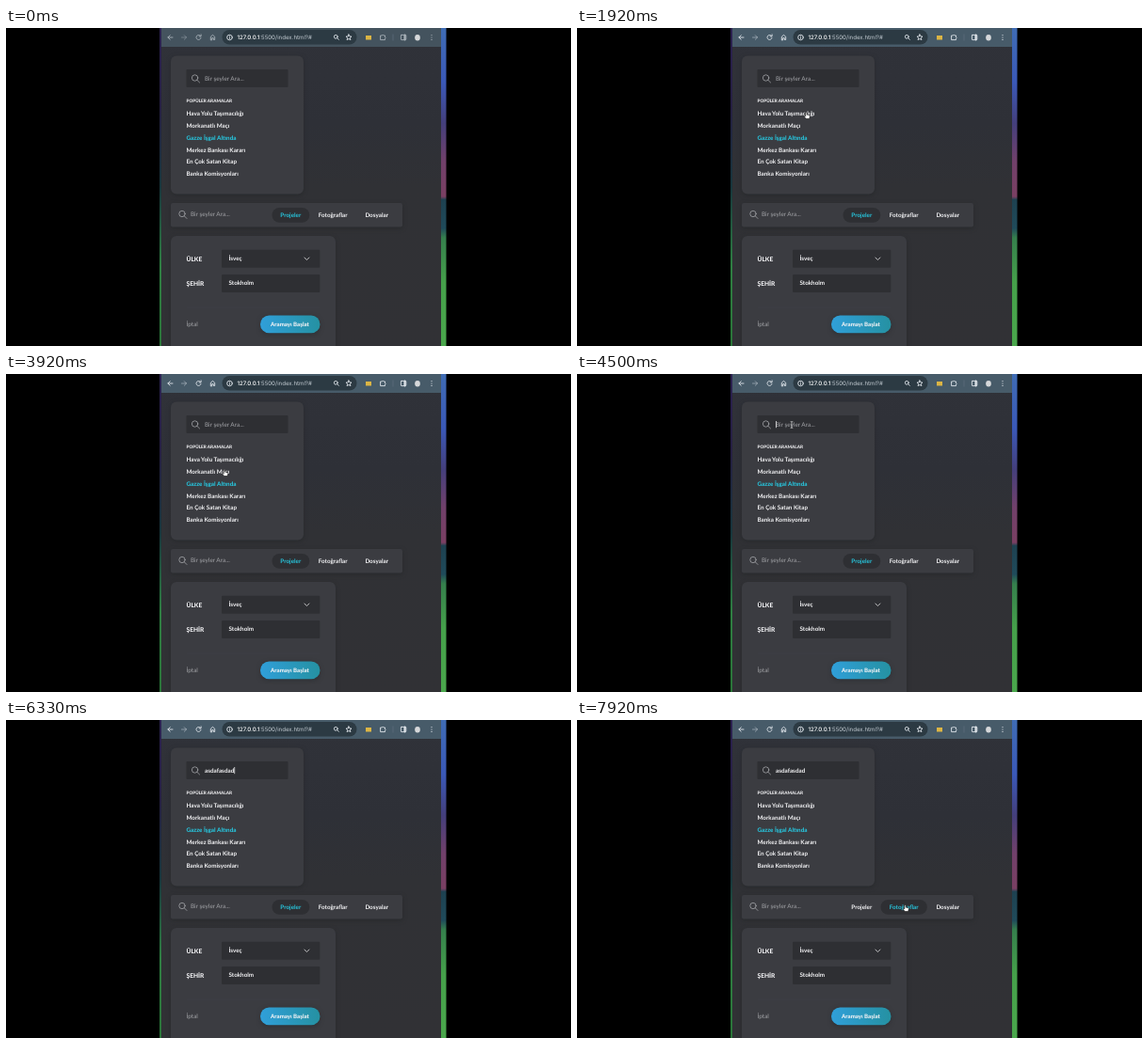
These frames come from a looping animation (600x338 px, 8000 ms). An HTML page:

```html
<!DOCTYPE html>
<html lang="tr">
<head>
<meta charset="utf-8">
<title>Arama</title>
<style>
  html, body { margin: 0; height: 100%; overflow: hidden; background: #000; }
  svg { display: block; }
  #stage { width: 100vw; height: 100vh; }
  text { font: 700 6.3px Lato, sans-serif; fill: #f3f3f5; text-rendering: geometricPrecision; }
  .bold { font-weight: 800; }
  .hint { font-weight: 500; font-size: 6.4px; fill: #9a9b9f; }
  .cyan, .tab.on { fill: #27c4dc; }
  .tab { text-anchor: middle; }
  .panel { fill: #3b3c41; filter: url(#shadow); }
  .field { fill: #2e2f33; }
  .line { fill: none; stroke: #a9aaae; stroke-width: .75; stroke-linecap: round; stroke-linejoin: round; }
  #bar { fill: #44535e; }
  #bar.active { fill: #475b69; }
  #nav { opacity: .65; }
  #nav.active { opacity: 1; }
  .icon { fill: none; stroke: #dfe5ea; stroke-width: .9; stroke-linecap: round; stroke-linejoin: round; }
  .url { font: 400 6.1px Inter, Roboto, sans-serif; fill: #c3cbd2; }
  .url tspan { fill: #fff; font-weight: 500; }
</style>
</head>
<body>
<svg id="stage" viewBox="0 0 600 338">
  <defs>
    <linearGradient id="page" x2="0" y2="1">
      <stop stop-color="#303239"/><stop offset=".3" stop-color="#2e3037"/>
      <stop offset=".5" stop-color="#303135"/><stop offset="1" stop-color="#313135"/>
    </linearGradient>
    <linearGradient id="right" x2="0" y2="1">
      <stop stop-color="#3f6cb4"/><stop offset=".17" stop-color="#3a58b8"/>
      <stop offset=".3" stop-color="#443f7c"/><stop offset=".42" stop-color="#71406a"/>
      <stop offset=".53" stop-color="#7a3f62"/><stop offset=".54" stop-color="#1d4150"/>
      <stop offset=".63" stop-color="#1f4a5a"/><stop offset=".66" stop-color="#357f4c"/>
      <stop offset=".8" stop-color="#45a04a"/><stop offset="1" stop-color="#4aa74c"/>
    </linearGradient>
    <linearGradient id="left" x2="0" y2="1">
      <stop stop-color="#2b2150"/><stop offset=".25" stop-color="#251f42"/>
      <stop offset=".5" stop-color="#17363c"/>
      <stop offset=".75" stop-color="#2f7f42"/><stop offset="1" stop-color="#2a7438"/>
    </linearGradient>
    <linearGradient id="button">
      <stop stop-color="#309fd9"/><stop offset="1" stop-color="#2591a2"/>
    </linearGradient>
    <filter id="shadow" x="-10%" y="-20%" width="120%" height="150%" color-interpolation-filters="sRGB">
      <feDropShadow dx="0" dy="1.500" stdDeviation="2.500" flood-color="#1d1e22" flood-opacity=".45"/>
    </filter>
    <g id="lens" class="line"><circle r="3.2"/><path d="M2.3 2.3 5 5"/></g>
  </defs>

  <rect width="600" height="338"/>
  <rect x="163" width="2" height="338" fill="url(#left)"/>
  <rect x="462" width="5.500" height="338" fill="url(#right)"/>
  <rect x="165" width="297" height="338" fill="url(#page)"/>

  <rect id="bar" x="165" width="297" height="20"/>
  <rect x="229.500" y="2" width="143" height="15.600" rx="7.800" fill="#2c3a43"/>
  <g id="nav" class="icon">
    <path d="M177 10H172M174.200 7.700 171.900 10 174.200 12.300"/>
    <path d="M186.500 10H191.500M189.300 7.700 191.600 10 189.300 12.300" opacity=".5"/>
    <path d="M206.600 8.500A2.500 2.500 0 1 0 207 10.500M207.100 6.900V8.900H205.100"/>
    <path d="M217.300 12.500V9.300L219.500 7.400 221.700 9.300V12.500H220.300V10.600H218.700V12.500Z"/>
    <path d="M398 8H399.300A.9.9 0 0 1 401 8H402.500V9.500A.9.9 0 0 1 402.500 11.200V12.600H398Z"/>
    <rect x="419.400" y="7.400" width="5.400" height="5.200" rx=".6"/>
    <path d="M423.500 7.500V12.500" stroke-width="2"/>
    <path d="M452 7.600V7.610M452 10V10.010M452 12.400V12.410" stroke-width="1.200"/>
  </g>
  <g class="icon" stroke-width=".8">
    <circle cx="237.500" cy="10" r="2.800"/><path d="M237.500 9.900V11.300M237.500 8.500V8.510"/>
    <circle cx="350.300" cy="9.300" r="1.900"/><path d="M351.800 10.800 353.300 12.300"/>
    <path d="M364 6.900 364.900 8.900 367 9.100 365.400 10.500 365.900 12.600 364 11.500 362.100 12.600 362.600 10.500 361 9.100 363.100 8.900Z"/>
  </g>
  <text class="url" x="245.500" y="12.100"><tspan>127.0.0.1</tspan>:5500/index.html?#</text>
  <rect x="382" y="8" width="6" height="4.500" fill="#dcb544"/>
  <path d="M411 6.500V13.500" stroke="#667583" stroke-width=".6"/>
  <ellipse cx="437" cy="10.200" rx="2.800" ry="3.200" fill="#d6d8da"/>

  <rect class="panel" x="175" y="29.500" width="141" height="147" rx="6"/>
  <rect class="field" x="191.500" y="44" width="108" height="19" rx="1"/>
  <use href="#lens" x="200.600" y="53"/>
  <text id="query" x="211" y="55.600"></text>
  <rect id="caret" x="211" y="50" width=".7" height="7.200" fill="#fff"/>
  <text class="bold" x="191.500" y="78.700" style="font-size:4.700px">POPÜLER ARAMALAR</text>
  <g id="list"></g>

  <rect class="panel" x="175" y="186" width="246" height="25.500" rx="2"/>
  <use href="#lens" x="187" y="197.500"/>
  <text class="hint" x="196" y="200.400">Bir şeyler Ara...</text>
  <rect id="pill" class="field" y="191" height="15.800" rx="7.900"/>
  <text class="tab" x="302.300" y="200.700">Projeler</text>
  <text class="tab" x="347.200" y="200.700">Fotoğraflar</text>
  <text class="tab" x="393.700" y="200.700">Dosyalar</text>

  <rect class="panel" x="175" y="221" width="175" height="130" rx="6"/>
  <text class="bold" x="191.500" y="247.500" style="font-size:6.600px">ÜLKE</text>
  <text class="bold" x="191.500" y="273.700" style="font-size:6.600px">ŞEHİR</text>
  <rect class="field" x="229" y="235.700" width="104.300" height="19" rx="1"/>
  <rect class="field" x="229" y="262" width="104.300" height="19" rx="1"/>
  <text x="236.500" y="247.200">İsveç</text>
  <text x="236.500" y="273.200">Stokholm</text>
  <path class="line" d="M316.900 244 319.400 246.500 321.900 244" style="stroke:#eee"/>
  <path d="M191.500 297H333.500" stroke="#414247" stroke-width=".6"/>
  <text class="hint" x="191.500" y="317.100">İptal</text>
  <rect x="270" y="305.500" width="63.500" height="18.800" rx="9.400" fill="url(#button)" filter="url(#shadow)"/>
  <text class="bold" x="281" y="317" style="font-size:6.100px">Aramayı Başlat</text>

  <g id="mouse" stroke-linejoin="round">
    <path id="arrow" d="M0 0V6.200L1.500 4.900 2.500 7.200 3.600 6.700 2.600 4.500H4.500Z" fill="#111" stroke="#e4e4e6" stroke-width=".65"/>
    <path id="hand" d="M-.7.600Q0-.400.700.600V2.600L3.300 3.200Q4 3.500 3.800 4.600L3.200 7H-.3L-2.300 4.500Q-2.300 3.500-1.400 3.800L-.7 4.400Z" fill="#fff" stroke="#111" stroke-width=".6"/>
    <path id="beam" d="M-1.300-3.500Q0-3.500 0-2.700 0-3.500 1.300-3.500M0-2.700V2.700M-1.300 3.500Q0 3.500 0 2.700 0 3.500 1.300 3.500" fill="none" stroke="#ddd" stroke-width=".7"/>
  </g>
</svg>
<script>
  const LOOP = 8000, FPS = 12;
  const $ = id => document.getElementById(id);
  const show = (el, on) => { el.style.display = on ? '' : 'none'; };
  const within = (t, a, b) => t >= a && t < b;

  const topics = ['Hava Yolu Taşımacılığı', 'Morkanatlı Maçı', 'Gazze İşgal Altında',
    'Merkez Bankası Kararı', 'En Çok Satan Kitap', 'Banka Komisyonları'];
  topics.forEach((topic, i) => {
    const row = document.createElementNS('http://www.w3.org/2000/svg', 'text');
    row.setAttribute('x', 191.5);
    row.setAttribute('y', 93.4 + i * 12.76);
    if (i === 2) row.setAttribute('class', 'bold cyan');
    row.textContent = topic;
    $('list').append(row);
  });

  // Pointer stops: time, x, y
  const path = [
    [250, 470, 156], [830, 337.5, 121], [1080, 337, 120.5], [1750, 246, 92], [1920, 243.5, 89.5],
    [2500, 243, 103], [3000, 237, 132], [3330, 235, 118], [3750, 232, 101.5],
    [4000, 232, 101.5], [4300, 228, 54], [6400, 228, 54], [6830, 375.5, 124],
    [7080, 375.5, 124], [7580, 348.5, 196.5], [8000, 348.5, 196.5]
  ];
  const typed = 'asdafasdad';
  const tabs = [...document.querySelectorAll('.tab')];

  function pointerAt(t) {
    let i = path.findIndex(stop => stop[0] > t);
    if (i < 1) i = 1;
    const [t0, x0, y0] = path[i - 1], [t1, x1, y1] = path[i];
    const p = Math.max(0, (t - t0) / (t1 - t0));
    const e = p * p * (3 - 2 * p);
    return [x0 + (x1 - x0) * e, y0 + (y1 - y0) * e];
  }

  function drawPointer(t) {
    const [x, y] = pointerAt(t);
    const overList = within(x, 190, 255) && within(y, 85, 160);
    const overTabs = within(x, 282, 421) && within(y, 190, 207);
    const overField = within(x, 191, 300) && within(y, 44, 63);
    $('mouse').setAttribute('transform', `translate(${x} ${y})`);
    show($('mouse'), x < 463 && !within(t, 5570, 6400));
    show($('hand'), overList || overTabs);
    show($('beam'), overField);
    show($('arrow'), !overList && !overTabs && !overField);
  }

  function drawSearch(t) {
    const count = t < 5570 ? 0 : Math.min(typed.length, 2 + Math.floor((t - 5570) / 90));
    const query = $('query');
    query.textContent = count ? typed.slice(0, count) : 'Bir şeyler Ara...';
    query.setAttribute('class', count ? '' : 'hint');
    $('caret').setAttribute('x', 211 + (count ? query.getComputedTextLength() + .2 : 0));
    show($('caret'), within(t, 4330, 4740) || within(t, 5070, 5410) || within(t, 5570, 6660));
  }

  function drawTabs(t) {
    const current = t < 7660 ? 0 : 1;
    tabs.forEach((tab, i) => tab.classList.toggle('on', i === current));
    $('pill').setAttribute('x', current ? 322.5 : 282.5);
    $('pill').setAttribute('width', current ? 49.3 : 39.8);
  }

  function draw(now) {
    const t = Math.floor((now % LOOP + 4) * FPS / 1000) * 1000 / FPS;
    for (const id of ['bar', 'nav']) $(id).classList.toggle('active', t > 1400);
    drawPointer(t);
    drawSearch(t);
    drawTabs(t);
  }

  const start = performance.now();
  function tick() {
    draw(performance.now() - start);
    requestAnimationFrame(tick);
  }
  tick();
</script>
</body>
</html>
```
